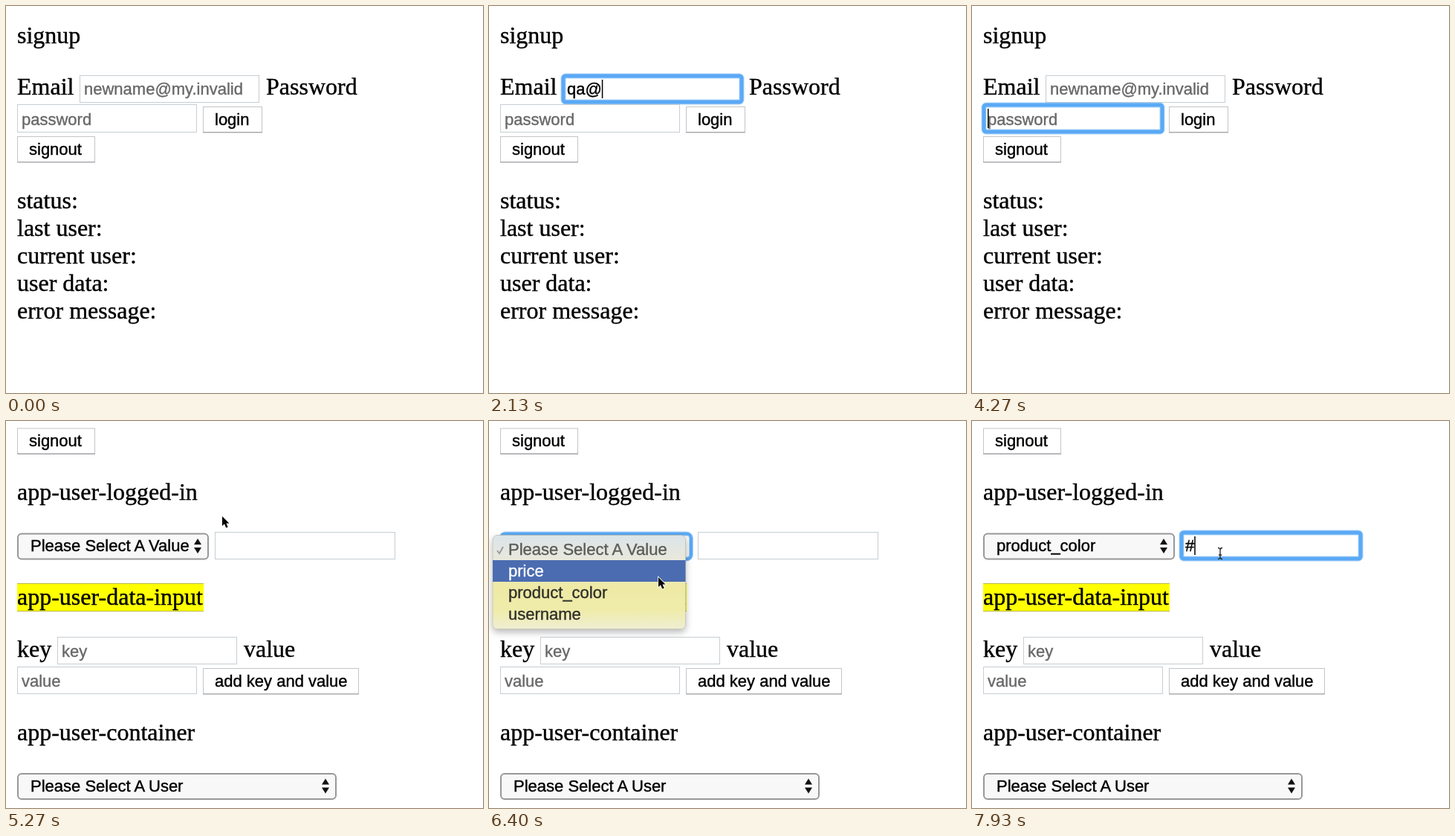
These frames come from a looping animation (642 px wide and 520 px high, 8000 ms). An HTML page:

```html
<!DOCTYPE html>
<html lang="en">
<head>
<meta charset="utf-8">
<title>Login form</title>
<style>
  html, body { margin: 0; width: 100%; height: 100%; overflow: hidden; background: #fff; }
  svg { display: block; width: 642px; height: 520px; }
  text { white-space: pre; stroke: currentColor; stroke-width: .4px; }
  .serif { font: 32px "Liberation Serif", serif; }
  .sans { font: 22px "Liberation Sans", sans-serif; text-rendering: optimizeLegibility; }
</style>
</head>
<body>
<svg id="stage" viewBox="0 0 642 520"></svg>
<script>
const LOOP = 8000, STEP = 200 / 3;
const stage = document.getElementById('stage');
const meter = document.createElement('canvas').getContext('2d');
meter.font = '22px "Liberation Sans", sans-serif';

const GREY = '#686868';
const EMAIL = 'qa@qa.invalid';
const EMAIL_KEYS = [1870, 1930, 2070, 2200, 2730, 2800, 2870, 2930, 2930, 3070, 3130, 3200, 3200];
const PASSWORD_KEYS = [3470, 3600, 3730, 3870, 4070, 4130];
const OPTIONS = ['Please Select A Value', 'price', 'product_color', 'username'];

// Pointer path as [time, x, y]; each list is one visible stretch.
const PATHS = [
  [[130, 340, 150], [400, 47, 18], [600, 134, 120], [1865, 134, 120]],
  [[4930, 150, 122], [5270, 291, 128], [5400, 291, 128], [5600, 485, 93], [5930, 228, 170],
   [6070, 228, 176], [6330, 228, 210], [6460, 228, 210], [6670, 228, 232], [6870, 228, 234],
   [7070, 360, 188], [7200, 334, 178], [LOOP, 334, 178]]
];

const BOXES = {
  email: [99, 93, 242, 37], password: [15, 132, 242, 38],
  field: [281, 149, 243, 37], key: [69, 290, 242, 37], value: [15, 330, 242, 37]
};

const between = (t, a, b) => t >= a && t < b;
const serif = (x, y, s) => `<text class="serif" x="${x}" y="${y}">${s}</text>`;
const sans = (x, y, s, fill = '#000') =>
  `<text class="sans" x="${x}" y="${y}" fill="${fill}" color="${fill}">${s}</text>`;
const rect = (x, y, w, h, attrs) => `<rect x="${x}" y="${y}" width="${w}" height="${h}" ${attrs}/>`;
const path = (d, attrs) => `<path d="${d}" ${attrs}/>`;
const typed = (s, keys, t) => s.slice(0, keys.filter(k => k <= t).length);

// Focus glow: a solid band with a softer, wider one around it.
function ring([x, y, w, h], rx = 3, width = 5) {
  const band = (size, opacity) => rect(x + 1, y + 1, w - 2, h - 2,
    `rx="${rx}" fill="none" stroke="#5ba9f5" stroke-width="${size}" stroke-opacity="${opacity}"`);
  return band(width + 2, .5) + band(width, 1);
}

function input(box, baseline, { text = '', hint = '', focus, caret } = {}) {
  const [x, y, w, h] = box, left = x + 6;
  let out = rect(x + .5, y + .5, w - 1, h - 1, 'fill="#fff" stroke="#c6ced3"');
  if (focus) out += ring(box);
  out += text ? sans(left, baseline, text) : sans(left, baseline, hint, GREY);
  if (caret) out += rect(left + meter.measureText(text).width, y + 6, 1.5, h - 12, 'fill="#000"');
  return out;
}

function button(x, y, w, label) {
  return rect(x + .5, y + .5, w - 1, 34, 'fill="#fff" stroke="#c2c5c8"') +
    rect(x, y + 34, w, 1.5, 'fill="#a9acb0"') + sans(x + 16, y + 24.5, label);
}

function select(x, y, w, label, focus) {
  const ax = x + w - 15, ay = y + 17.5;
  return rect(x + 1, y + 1, w - 2, 34, 'rx="5" fill="#f8f8f8" stroke="#989898" stroke-width="2"') +
    (focus ? ring([x, y, w, 36], 6, 4) : '') + sans(x + 18, y + 24.5, label) +
    path(`M${ax - 5} ${ay - 2}h10l-5-8zM${ax - 5} ${ay + 2}h10l-5 8z`, 'fill="#111"');
}

function loginPage(t) {
  const onEmail = between(t, 670, 3330), onPassword = t >= 3330;
  const submitted = t >= 4270;
  return serif(15, 50, 'signup') + serif(15, 119, 'Email') + serif(350, 119, 'Password') +
    input(BOXES.email, 119, {
      text: submitted ? '' : typed(EMAIL, EMAIL_KEYS, t), hint: 'newname@my.invalid',
      focus: onEmail, caret: onEmail && !between(t, 1000, 1530)
    }) +
    input(BOXES.password, 159.5, {
      text: submitted ? '' : typed('••••••', PASSWORD_KEYS, t), hint: 'password',
      focus: onPassword, caret: onPassword && t < 4600
    }) +
    button(265, 135, 80, 'login') + button(15, 175, 105, 'signout') +
    ['status:', 'last user:', 'current user:', 'user data:', 'error message:']
      .map((s, i) => serif(15, 272 + 37 * i, s)).join('');
}

function menu(pointerY) {
  const active = Math.max(0, Math.min(3, Math.floor((pointerY - 158) / 29)));
  const rowTop = 158 + 29 * active;
  return rect(5, 153.5, 259.5, 126, 'rx="6" fill="url(#glass)" stroke="#b9b9aa" stroke-width=".7" filter="url(#shadow)"') +
    rect(5, rowTop, 259.5, 29, 'fill="#4b6cb0"') +
    path('M11 174l3 4 5-9', `fill="none" stroke="${active ? '#999' : '#fff'}" stroke-width="1.8"`) +
    OPTIONS.map((s, i) => sans(26, 180 + 29 * i, s, i === active ? '#fff' : i ? '#30302a' : '#5c5c58')).join('');
}

function userPage(t, pointer) {
  const open = between(t, 6000, 6930), onField = t >= 7470;
  return button(15, 9.5, 105, 'signout') + serif(15, 106, 'app-user-logged-in') +
    select(15, 150.5, 258, t < 6930 ? OPTIONS[0] : OPTIONS[2], between(t, 6000, 7470)) +
    input(BOXES.field, 175, { text: t >= 7930 ? '#' : '', focus: onField, caret: onField }) +
    rect(15, 218, 251, 38, 'fill="#ff0"') +
    path('M15 218.5h251M15 255.5h251', 'stroke="#b8b83c"') +
    serif(15, 247, 'app-user-data-input') +
    serif(15, 317, 'key') + serif(320, 317, 'value') +
    input(BOXES.key, 316.5, { hint: 'key' }) + input(BOXES.value, 356.5, { hint: 'value' }) +
    button(265, 332, 210, 'add key and value') + serif(15, 429, 'app-user-container') +
    select(15, 473, 430, 'Please Select A User') + (open ? menu(pointer[1]) : '');
}

function pointerAt(t) {
  const keys = PATHS.find(p => between(t, p[0][0], p[p.length - 1][0]));
  if (!keys) return null;
  const time = Math.max(keys[0][0], Math.floor((t + 5) / STEP) * STEP);
  const next = keys.findIndex(k => k[0] > time);
  const i = next < 0 ? keys.length - 1 : next;
  const [t0, x0, y0] = keys[i - 1], [t1, x1, y1] = keys[i];
  const u = Math.min(1, (time - t0) / (t1 - t0)), ease = u * u * (3 - 2 * u);
  return [x0 + (x1 - x0) * ease, y0 + (y1 - y0) * ease];
}

function cursor([x, y], fields) {
  const overField = fields.some(([l, top, w, h]) => between(x, l, l + w) && between(y, top, top + h));
  return `<g transform="translate(${x} ${y})">` + (overField
    ? path('M-3-7.5q3 0 3 2.5q0-2.5 3-2.5M0-5V5M-3 7.5q3 0 3-2.5q0 2.5 3 2.5M-2 2h4', 'fill="none" stroke="#222" stroke-width="1.3"')
    : path('M0 0V13l3-2.8 2.2 5.2 2.5-1-2.2-5H9.5z', 'stroke="#fff" stroke-width="1.6" paint-order="stroke"')) + '</g>';
}

const stops = [[0, '#dce4e9'], [.25, '#e8e8dd'], [.55, '#eeeaa5'], [.8, '#efecaa'], [1, '#efeed2']]
  .map(([at, color]) => `<stop offset="${at}" stop-color="${color}"/>`).join('');
const defs = `<defs><linearGradient id="glass" x2="0" y2="1">${stops}</linearGradient>
  <filter id="shadow" x="-10%" y="-10%" width="120%" height="130%">
  <feDropShadow dx="0" dy="4" stdDeviation="5" flood-opacity=".28"/></filter></defs>`;

function frame() {
  const t = performance.now() % LOOP, pointer = pointerAt(t), loggedIn = t >= 4870;
  const fields = loggedIn ? [BOXES.field, BOXES.key, BOXES.value] : [BOXES.email, BOXES.password];
  stage.innerHTML = defs + (loggedIn ? userPage(t, pointer) : loginPage(t)) +
    (pointer ? cursor(pointer, fields) : '');
  requestAnimationFrame(frame);
}
frame();
</script>
</body>
</html>
```
